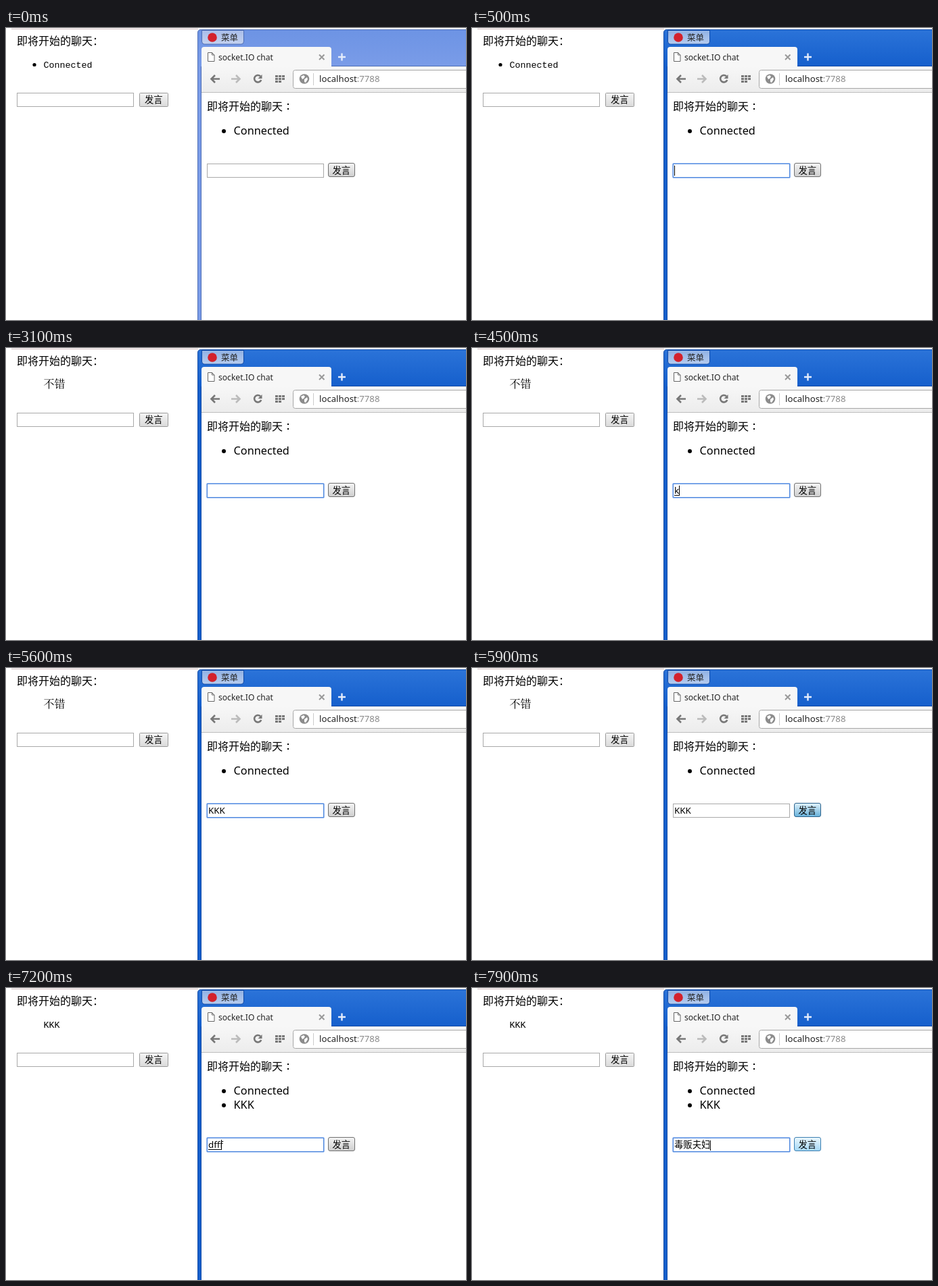
Write an HTML page that moves like this. It is 680 px wide and 433 px high and loops after 8000 ms.

```html
<!DOCTYPE html>
<html lang="zh-CN">
<head>
<meta charset="utf-8">
<title>Chat</title>
<style>
  html, body { margin: 0; width: 100%; height: 100%; overflow: hidden; background: #fff; }
  svg { display: block; width: 680px; height: 433px; font-family: 'Noto Sans', 'Noto Sans CJK SC', sans-serif; }
  text { white-space: pre; }
  .old { font-family: 'Liberation Mono', 'Noto Serif CJK SC', 'Noto Sans CJK SC', monospace; }
  .han { font-family: 'Noto Sans CJK SC', sans-serif; }
  .page { font-size: 16.3px; }
  .field { fill: #fff; stroke: #a9a9a9; }
  .sharp { shape-rendering: crispEdges; }

  #window { --top: #6c93e4; --bar: #7a9ce8; --edge: #4d6db4; --menu: #c3d1ef; --menu2: #a9bdea; }
  #window.active { --top: #2c74d9; --bar: #155fcc; --edge: #0f49a6; --menu: #b5cbee; --menu2: #90b1e4; }
  .top { stop-color: var(--top); }
  .bar { stop-color: var(--bar); }
  .menu { stop-color: var(--menu); }
  .menu2 { stop-color: var(--menu2); }

  #send { --a: #f4f4f4; --b: #cecece; --line: #707070; }
  #send.hover { --a: #ebf7fe; --b: #a4d8f5; --line: #3c7fb1; }
  #send.pressed { --a: #e0f2fc; --b: #66b1da; --line: #2c628b; }
  .a { stop-color: var(--a); }
  .b { stop-color: var(--b); }
</style>
</head>
<body>
<svg viewBox="0 0 680 433">
  <defs>
    <linearGradient id="plain" x2="0" y2="1"><stop stop-color="#f5f5f5"/><stop offset="1" stop-color="#dadada"/></linearGradient>
    <linearGradient id="tool" x2="0" y2="1"><stop stop-color="#f7f7f7"/><stop offset="1" stop-color="#ececec"/></linearGradient>
  </defs>
  <rect width="680" height="433" fill="#fff"/>

  <!-- left page -->
  <rect x="8" y="1" width="276" height="1" fill="#d3bfc1"/>
  <g class="old" font-size="16">
    <text x="16" y="25" class="han">即将开始的聊天：</text>
    <circle id="leftBullet" cx="42" cy="54.5" r="2.6"/>
    <text id="leftItem" x="55.5" y="59"></text>
  </g>
  <rect class="field" x="16.5" y="96.5" width="172" height="20"/>
  <rect x="197.5" y="96.5" width="42" height="20" rx="1" fill="url(#plain)" stroke="#999"/>
  <text class="han" x="205" y="111" font-size="13.33">发言</text>

  <!-- browser window -->
  <g id="window">
    <linearGradient id="title" x2="0" y2="57" gradientUnits="userSpaceOnUse"><stop class="top"/><stop offset="1" class="bar"/></linearGradient>
    <linearGradient id="menuFill" x2="0" y2="1"><stop class="menu2"/><stop offset="1" class="menu"/></linearGradient>
    <path d="M283.5 440V7q0-4.500 4.500-4.500H690V440z" fill="url(#title)" stroke="var(--edge)"/>
    <path d="M288.500 57V433M481 56.500H680" stroke="var(--edge)"/>
    <path d="M289.500 3.500H351.500V20q0 4-4 4H293.500q-4 0-4-4z" fill="url(#menuFill)" stroke="var(--edge)"/>
    <circle cx="305" cy="14" r="6.800" fill="#d3212c"/>
    <text class="han" x="318" y="18.500" font-size="12.500" fill="#222">菜单</text>

    <path d="M289 58V32q0-4 4-4H477q4 0 4 4V58z" fill="#f7f7f7"/>
    <rect x="289" y="57" width="391" height="39" fill="url(#tool)"/>
    <rect x="289" y="95" width="391" height="1" fill="#bdbdbd"/>
    <path d="M298.500 36.500h6l3.500 3.500v9.500h-9.500zM304.500 36.500v3.500h3.500" fill="#fff" stroke="#666"/>
    <text x="314" y="48" font-size="12.100" fill="#222">socket.IO chat</text>
    <path d="M463 39.500l7.500 7.500m0-7.500l-7.500 7.500" stroke="#999" stroke-width="2"/>
    <path d="M491 43h11M496.500 37.500v11" stroke="#e4ecfb" stroke-width="2.400"/>

    <g fill="none" stroke="#777" stroke-width="2.600">
      <path id="arrow" d="M316 75.500H304M309 70l-5.500 5.500 5.500 5.500"/>
      <path d="M333 75.500h12M340 70l5.500 5.500-5.500 5.500" stroke="#bbb"/>
      <path d="M376 71.500a5.200 5.200 0 1 0 1.200 5.500"/>
      <path d="M378.500 69v6h-6z" fill="#777" stroke="none"/>
      <path d="M398 71.500h14M398 75.500h14M398 79.500h9" stroke-width="3" stroke-dasharray="4 1"/>
    </g>

    <rect x="424.500" y="62.500" width="270" height="27" rx="3" fill="#fff" stroke="#a6a6a6"/>
    <circle cx="441" cy="75.500" r="7.300" fill="#8c8c8c"/>
    <path d="M436 72l4-2 2 2-2 3-2 1zM441 76l4-3 1 3-3 5-2-1z" fill="#fff"/>
    <path d="M454.500 67V85" stroke="#ccc"/>
    <text x="463" y="80" font-size="13.200" fill="#222">localhost<tspan fill="#888">:7788</tspan></text>

    <rect x="289" y="96" width="391" height="337" fill="#fff"/>
    <text class="han" x="297" y="121.500" font-size="16">即将开始的聊天</text>
    <path d="M416 112h2v2h-2zM416 119h2v2h-2z"/>
    <circle cx="322" cy="153" r="3"/>
    <text class="page" x="336.500" y="158">Connected</text>
    <g id="rightItem">
      <circle cx="322" cy="174" r="3"/>
      <text class="page" x="336.500" y="179">KKK</text>
    </g>

    <g id="form">
      <rect class="field" x="297.500" y="201.500" width="172" height="20"/>
      <g id="ring" fill="none">
        <rect x="296.500" y="200.500" width="174" height="22" rx="1.500" stroke="#a3c2f3"/>
        <rect x="297.500" y="201.500" width="172" height="20" stroke="#4f88dd"/>
      </g>
      <text id="typed" x="299" y="216" font-size="13.330"></text>
      <rect id="underline" class="sharp" x="299" y="218" height="1"/>
      <rect id="caret" class="sharp" width="1" height="15"/>
      <g id="send">
        <linearGradient id="sendFill" x2="0" y2="1"><stop class="a"/><stop offset="1" class="b"/></linearGradient>
        <rect x="476.500" y="200.500" width="39" height="20" rx="2.500" fill="url(#sendFill)" stroke="var(--line)"/>
        <text class="han" x="482.500" y="216" font-size="13.330">发言</text>
      </g>
    </g>
  </g>
</svg>
<script>
const LOOP = 8000;
const el = id => document.getElementById(id);
const show = (id, on) => el(id).setAttribute('visibility', on ? 'visible' : 'hidden');

const initial = { active: false, focus: false, text: '', end: 299, caret: false, left: 'Connected', sent: false, button: '' };
const type = (text, end) => ({ text, end, caret: true });
const on = { caret: true }, off = { caret: false };

// Each step changes part of the state from its time on.
const steps = [
  [500, { active: true, focus: true, caret: true }], [1000, off],
  [1300, type('b', 306)], [1400, type('bu', 313)], [1600, type('buc', 320)],
  [1700, type('bucu', 327)], [1800, type('bucuo', 334)], [1900, type('不错', 326)], [2400, off],
  [2600, { ...type('', 299), left: '不错' }], [3100, off], [3600, on], [4100, off],
  [4500, type('k', 306)], [4700, type('kk', 313)], [4800, type('kkk', 320)],
  [5100, type('KKK', 326)], [5600, off],
  [5800, { button: 'hover' }], [5900, { button: 'pressed', focus: false }],
  [6000, { text: '', end: 299, left: 'KKK', sent: true, button: '' }],
  [6500, { focus: true, caret: true }],
  [6800, type('d', 306)], [6900, type('df', 310)], [7100, type('dff', 314)], [7200, type('dfff', 318)],
  [7600, type('毒贩夫妇', 352)], [7900, { button: 'hover' }],
];

function draw(time) {
  const s = Object.assign({}, initial, ...steps.filter(([at]) => at <= time).map(([, change]) => change));
  const composing = /[a-z]/.test(s.text);
  const han = text => /[^\x00-\x7f]/.test(text);

  el('window').setAttribute('class', s.active ? 'active' : '');
  el('send').setAttribute('class', s.button);
  el('form').setAttribute('transform', `translate(0 ${s.sent ? 21 : 0})`);
  el('typed').textContent = s.text;
  el('leftItem').textContent = s.left;
  el('leftItem').setAttribute('font-size', han(s.left) ? 16 : 13.33);
  el('underline').setAttribute('width', s.end - 300 + 1);
  el('caret').setAttribute('x', s.end);
  el('caret').setAttribute('y', han(s.text) ? 205 : 204);
  show('leftBullet', s.left === 'Connected');
  show('rightItem', s.sent);
  show('ring', s.focus);
  show('underline', composing);
  show('caret', s.focus && s.caret);
}

function tick() {
  draw(performance.now() % LOOP);
  requestAnimationFrame(tick);
}
tick();
</script>
</body>
</html>
```
